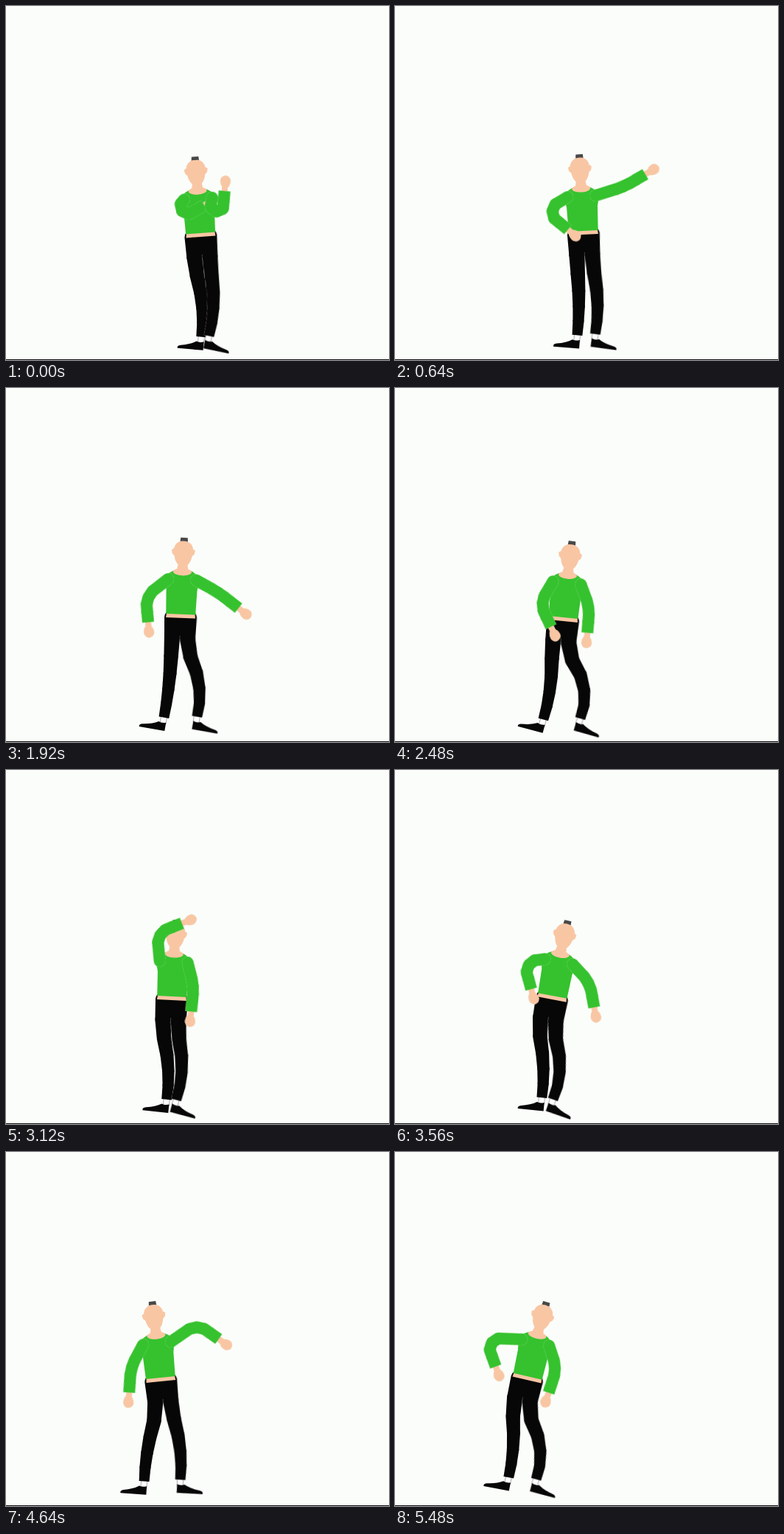
An HTML page without scripts that plays this animation: 520 by 480 pixels, repeating every 5.58 s.

```html
<!DOCTYPE html>
<html lang="en">
<head>
<meta charset="utf-8">
<title>Dancer</title>
<style>
html, body { margin: 0; width: 100%; height: 100%; overflow: hidden; background: #fbfdfa; }
svg { display: block; width: 520px; height: 480px; }

/* waist place and lean */
@property --x { syntax: "<length>"; inherits: true; initial-value: 0px; }
@property --y { syntax: "<length>"; inherits: true; initial-value: 0px; }
@property --lean { syntax: "<angle>"; inherits: true; initial-value: 0deg; }
/* arms: shoulder angle, elbow bend, upper length */
@property --la { syntax: "<angle>"; inherits: true; initial-value: 0deg; }
@property --le { syntax: "<angle>"; inherits: true; initial-value: 0deg; }
@property --lu { syntax: "<number>"; inherits: true; initial-value: 1; }
@property --ra { syntax: "<angle>"; inherits: true; initial-value: 0deg; }
@property --re { syntax: "<angle>"; inherits: true; initial-value: 0deg; }
@property --ru { syntax: "<number>"; inherits: true; initial-value: 1; }
/* legs: hip turn, knee bend */
@property --lh { syntax: "<angle>"; inherits: true; initial-value: 0deg; }
@property --lk { syntax: "<angle>"; inherits: true; initial-value: 0deg; }
@property --rh { syntax: "<angle>"; inherits: true; initial-value: 0deg; }
@property --rk { syntax: "<angle>"; inherits: true; initial-value: 0deg; }

.dancer {
  animation: dance 5580ms linear infinite;
  transform: translate(var(--x), var(--y)) rotate(var(--lean));
}
.head { transform: translate(0, -63px) rotate(calc(var(--lean) * .2)); }

.arm { filter: drop-shadow(0 0 .5px #d5efd2); }
.leg.right { filter: drop-shadow(0 0 .6px #fff); }
.arm.left { --a: var(--la); --e: var(--le); --u: var(--lu); }
.arm.right { --a: var(--ra); --e: var(--re); --u: var(--ru); }
.leg.left { --h: var(--lh); --k: var(--lk); --side: -1; }
.leg.right { --h: var(--rh); --k: var(--rk); --side: 1; }

/* a limb is a chain; each joint takes an equal share of the bend */
.shoulder { transform: rotate(var(--a)); }
.upper { transform: scaleY(var(--u)); }
.elbow { transform: translate(0, calc(26px * var(--u))) rotate(calc(var(--e) / 3)); }
.elbow .elbow { transform: translate(0, 10px) rotate(calc(var(--e) / 3)); }
.hip { transform: translate(0, 27.5px) rotate(calc(var(--h) / 2)) scale(.92); }
.knee { transform: translate(0, 27.5px) rotate(calc(var(--k) / 3)) scale(.92); }
.foot { transform: translate(0, 27.5px) scale(1.52) scaleX(var(--side)); }

.skin { fill: #f9c6a4; }
.shirt { fill: #35c22e; }
.pants { fill: #060706; }
.sock { fill: #fff; stroke: #777; stroke-width: .6; }

@keyframes dance {
  0% {
    --x: 264.5px; --y: 313px; --lean: -4deg;
    --la: 44deg; --le: -160deg; --lu: .3; --ra: 14deg; --re: -185deg; --ru: .5;
    --lh: -8deg; --lk: 17deg; --rh: -2deg; --rk: 18deg;
  }
  5.7% { --ra: -110deg; --re: -70deg; --ru: 1; }
  22.9% {
    --x: 247.5px; --y: 307px; --lean: -2deg;
    --la: 80deg; --le: -60deg; --lu: 1.2; --ra: -93deg; --re: 100deg; --ru: 1.45;
    --lh: 8deg; --lk: -2deg; --rh: -9deg; --rk: 14deg;
  }
  28.7% { --ra: -85deg; --re: 0deg; --ru: 1; }
  44.4% {
    --x: 228px; --y: 316px; --lean: 6deg;
    --la: 24deg; --le: -55deg; --lu: .9; --ra: -26deg; --re: 25deg; --ru: .9;
    --lh: -4deg; --lk: 13deg; --rh: -35deg; --rk: 45deg;
  }
  50%, 62% { --la: 85deg; --le: -115deg; --lu: .5; --ra: -60deg; --re: 40deg; }
  55.9% {
    --x: 225px; --y: 312px; --lean: 3deg;
    --la: 172deg; --le: 75deg; --lu: 1; --ra: -17deg; --re: 20deg; --ru: .9;
    --lh: -13deg; --lk: 16deg; --rh: -11deg; --rk: 23deg;
  }
  71.6% {
    --x: 201px; --y: 310px; --lean: 18deg;
    --la: 20deg; --le: -28deg; --lu: .8; --ra: -26deg; --re: 0deg; --ru: .9;
    --lh: -24deg; --lk: 11deg; --rh: -33deg; --rk: 38deg;
  }
  77.4% { --la: 65deg; }
  83.1% {
    --x: 210.5px; --y: 311px; --lean: -6deg;
    --la: 34deg; --le: -24deg; --lu: .95; --ra: -119deg; --re: 70deg; --ru: 1.2;
    --lh: 20deg; --lk: -10deg; --rh: -8deg; --rk: 17deg;
  }
  98.2%, 100% {
    --x: 179px; --y: 309px; --lean: 13deg;
    --la: 79deg; --le: -112deg; --lu: 1.25; --ra: -31deg; --re: 36deg; --ru: .85;
    --lh: -15deg; --lk: 13deg; --rh: -35deg; --rk: 37deg;
  }
}
</style>
</head>
<body>
<svg viewBox="0 0 520 480">
  <defs>
    <path id="cloth" class="pants" d="M-11.5 0A11.5 11.5 0 0 1 11.5 0L10.5 28.5H-10.5Z"/>
    <path id="sleeve" class="shirt" d="M-8 0A8 8 0 0 1 8 0V11H-8Z"/>

    <g id="leg">
      <use href="#cloth"/>
      <g class="hip"><use href="#cloth"/>
        <g class="hip"><use href="#cloth"/>
          <g class="knee"><use href="#cloth"/>
            <g class="knee"><use href="#cloth"/>
              <g class="knee">
                <g class="foot">
                  <path class="sock" d="M-4-1H4V9H-4Z"/>
                  <path class="pants" d="M-4 7Q2 9 6 7Q14 12 27 14Q32 15 31 18.500H-4Z"/>
                </g>
                <use href="#cloth"/>
              </g>
            </g>
          </g>
        </g>
      </g>
    </g>

    <g id="arm">
      <g class="shoulder">
        <circle class="shirt" r="8"/>
        <rect class="shirt upper" x="-8" width="16" height="26"/>
        <g class="elbow"><use href="#sleeve"/>
          <g class="elbow"><use href="#sleeve"/>
            <g class="elbow">
              <path class="skin" d="M-4 22V29Q-7.500 33-7 39Q-5 45 0 45Q6 44 7 39Q7 33 4 30V22Z"/>
              <use href="#sleeve"/>
              <rect class="shirt" x="-8" y="8" width="16" height="16"/>
            </g>
          </g>
        </g>
      </g>
    </g>
  </defs>

  <rect y="479" width="520" height="1" fill="#111"/>

  <g class="dancer">
    <use class="leg left" href="#leg" x="-10.500"/>
    <use class="leg right" href="#leg" x="10.500"/>

    <path class="pants" d="M-21 0H21L20 24H-20Z"/>
    <path class="skin" d="M-19-8H19L20 0H-20Z"/>
    <path class="shirt" d="M-20-5L-21-38-24-52Q-21-60-12-64Q0-55 12-64Q21-60 24-52L21-38 20-5Z"/>
    <ellipse class="skin" cy="-62.500" rx="12.500" ry="5"/>

    <g class="head">
      <path d="M-5-40L-4.500-46H5L5.500-40Z" fill="#484848"/>
      <path class="skin" d="M-5-41Q0-42 5-41Q12-38 13-31L16-29 15-24 12-21Q11-14 6.500-9L8-1Q0 5-8-1L-6.500-9Q-11-14-12-21L-15-24-16-29-13-31Q-12-38-5-41Z"/>
    </g>

    <use class="arm left" href="#arm" x="-19" y="-52"/>
    <use class="arm right" href="#arm" x="19" y="-52"/>
  </g>
</svg>
</body>
</html>
```
